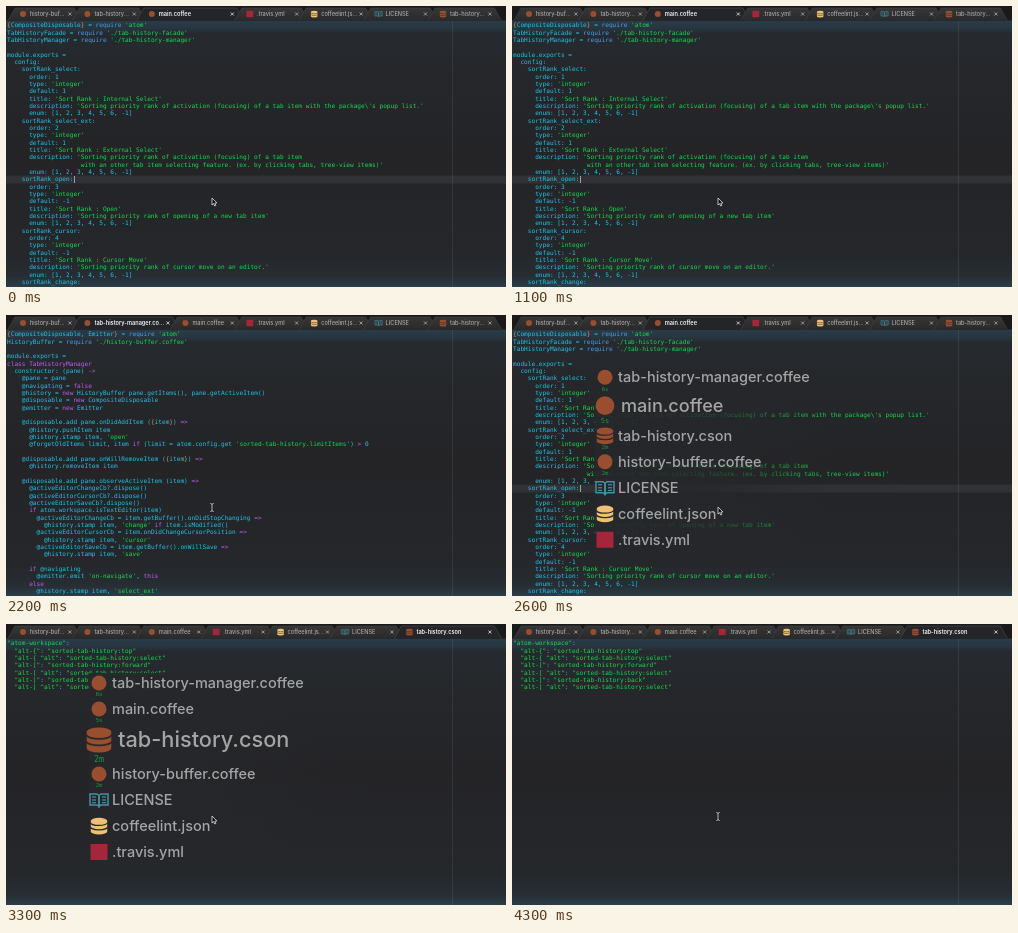
These frames come from a looping animation (500 px wide and 281 px high, 4.4 s). An HTML page with a canvas:

```html
<!DOCTYPE html>
<html lang="en">
<head>
<meta charset="utf-8">
<title>Sorted tab history</title>
<style>
html, body { margin: 0; width: 100%; height: 100%; overflow: hidden; background: #222326; }
canvas { display: block; width: 100vw; height: 100vh; }
</style>
</head>
<body>
<canvas id="stage"></canvas>
<script>
const W = 500, H = 281, LOOP = 4400;
const canvas = document.getElementById('stage');
const ctx = canvas.getContext('2d');
const SANS = 'Inter, sans-serif', MONO = '"DejaVu Sans Mono", monospace';
const CODE_SIZE = 6.13, CHAR = 3.69, LINE = 7.33, TOP = 19.3;
const CYAN = '#22c3e6', GREEN = '#12dc50', PURPLE = '#c25cf0', BLUE = '#459ff0', ORANGE = '#ee8a48';
const RUST = '#984e2f', YELLOW = '#f0c074', TEAL = '#4690a6', RED = '#a3263a';

const option = (name, order, def, title, text) => `
    sortRank_${name}:
      order: ${order}
      type: 'integer'
      default: ${def}
      title: 'Sort Rank : ${title}'
      description: 'Sorting priority rank of ${text}'
      enum: [1, 2, 3, 4, 5, 6, -1]`;

const MAIN = `{CompositeDisposable} = require 'atom'
TabHistoryFacade = require './tab-history-facade'
TabHistoryManager = require './tab-history-manager'

module.exports =
  config:` +
  option('select', 1, 1, 'Internal Select', "activation (focusing) of a tab item with the package\\'s popup list.") +
  option('select_ext', 2, 1, 'External Select', 'activation (focusing) of a tab item\n' + ' '.repeat(20) +
    'with an other tab item selecting feature. (ex. by clicking tabs, tree-view items)') +
  option('open', 3, -1, 'Open', 'opening of a new tab item') +
  option('cursor', 4, -1, 'Cursor Move', 'cursor move on an editor.') +
  '\n    sortRank_change:';

const MANAGER = `{CompositeDisposable, Emitter} = require 'atom'
HistoryBuffer = require './history-buffer.coffee'

module.exports =
class TabHistoryManager
  constructor: (pane) ->
    @pane = pane
    @navigating = false
    @history = new HistoryBuffer pane.getItems(), pane.getActiveItem()
    @disposable = new CompositeDisposable
    @emitter = new Emitter

    @disposable.add pane.onDidAddItem ({item}) =>
      @history.pushItem item
      @history.stamp item, 'open'
      @forgetOldItems limit, item if (limit = atom.config.get 'sorted-tab-history.limitItems') > 0

    @disposable.add pane.onWillRemoveItem ({item}) =>
      @history.removeItem item

    @disposable.add pane.observeActiveItem (item) =>
      @activeEditorChangeCb?.dispose()
      @activeEditorCursorCb?.dispose()
      @activeEditorSaveCb?.dispose()
      if atom.workspace.isTextEditor(item)
        @activeEditorChangeCb = item.getBuffer().onDidStopChanging =>
          @history.stamp item, 'change' if item.isModified()
        @activeEditorCursorCb = item.onDidChangeCursorPosition =>
          @history.stamp item, 'cursor'
        @activeEditorSaveCb = item.getBuffer().onWillSave =>
          @history.stamp item, 'save'

      if @navigating
        @emitter.emit 'on-navigate', this
      else
        @history.stamp item, 'select_ext'`;

const bind = (key, command) => `\n  "alt-${key}": "sorted-tab-history:${command}"`;
const KEYS = '"atom-workspace":' + bind('{', 'top') + bind('{ ^alt', 'select') +
  bind('[', 'forward') + bind('[ ^alt', 'select') + bind(']', 'back') + bind('] ^alt', 'select');

// Split source text into coloured runs with row and column.
function tokenize(text) {
  const rule = /('(?:\\.|[^'\\])*'|"[^"]*")|(\b(?:class(?: \w+)?|if|else|new|this|false)\b|[-=]>|>)|(\brequire\b)|(\w+(?=\())|([{}])|([@\w.?]+|[^\s])|(\s+)/g;
  const colors = [GREEN, PURPLE, BLUE, GREEN, ORANGE, CYAN, CYAN];
  const runs = [];
  let row = 0, col = 0;
  for (const [all, ...groups] of text.matchAll(rule)) {
    const color = colors[groups.findIndex(Boolean)];
    all.split('\n').forEach((part, i) => {
      if (i) { row++; col = 0; }
      const lead = part.length - part.trimStart().length;
      if (part.trim()) runs.push({ text: part.trimStart(), row, col: col + lead, color });
      col += part.length;
    });
  }
  return runs;
}

const FILES = {
  buffer: { name: 'history-buffer.coffee', tab: 'history-buf...', icon: dot },
  manager: { name: 'tab-history-manager.coffee', tab: 'tab-history...', active: 'tab-history-manager.co...', icon: dot, code: tokenize(MANAGER) },
  main: { name: 'main.coffee', tab: 'main.coffee', icon: dot, code: tokenize(MAIN) },
  travis: { name: '.travis.yml', tab: '.travis.yml', icon: block },
  lint: { name: 'coffeelint.json', tab: 'coffeelint.js...', icon: () => stack(YELLOW) },
  license: { name: 'LICENSE', tab: 'LICENSE', icon: book },
  cson: { name: 'tab-history.cson', tab: 'tab-history...', active: 'tab-history.cson', icon: () => stack(RUST), code: tokenize(KEYS) }
};
const TABS = Object.keys(FILES);
const REST = ['cson', 'buffer', 'license', 'lint', 'travis'];

// Each popup session: list order, time of each selection, fade span.
const POPUPS = [
  { list: ['main', 'manager', ...REST], picks: [[1300, 'manager']], fade: [1550, 2050],
    ages: { main: '8s', manager: '0ms', cson: '2m', buffer: '2m' } },
  { list: ['manager', 'main', ...REST], picks: [[2500, 'main'], [2900, 'cson']], fade: [3500, 3900],
    ages: { manager: '6s', main: '5s', cson: '2m', buffer: '2m' } }
];
const PICKS = [[0, 'main'], ...POPUPS.flatMap(p => p.picks)];

const clamp = v => Math.max(0, Math.min(1, v));

function text(str, x, y, size, color, family = SANS, weight = 400, align = 'left') {
  ctx.font = `${weight} ${size}px ${family}`;
  ctx.fillStyle = color;
  ctx.textAlign = align;
  ctx.textBaseline = 'alphabetic';
  ctx.fillText(str, x, y + size * 0.35);
}

function line(points, color, width) {
  ctx.beginPath();
  points.forEach(([x, y]) => ctx.lineTo(x, y));
  ctx.strokeStyle = color;
  ctx.lineWidth = width;
  ctx.stroke();
}

// Linear gradient from [position, colour] stops.
function ramp(x0, y0, x1, y1, stops) {
  const g = ctx.createLinearGradient(x0, y0, x1, y1);
  stops.forEach(([p, c]) => g.addColorStop(p, c));
  return g;
}

// Icons are drawn around the origin in an 18 unit box.
function dot() {
  ctx.fillStyle = RUST;
  ctx.beginPath();
  ctx.arc(0, 0, 7.5, 0, 7);
  ctx.fill();
}

function block() {
  ctx.fillStyle = RED;
  ctx.fillRect(-8.5, -8, 17, 16);
}

function stack(color) {
  ctx.fillStyle = color;
  ctx.beginPath();
  ctx.ellipse(0, -5.2, 8.2, 3, 0, Math.PI, 0);
  ctx.ellipse(0, 5.5, 8.2, 3, 0, 0, Math.PI);
  ctx.fill();
  ctx.strokeStyle = '#28292c';
  ctx.lineWidth = 1.2;
  for (const y of [-3.6, 0.8]) {
    ctx.beginPath();
    ctx.ellipse(0, y, 8.6, 3, 0, 0, Math.PI);
    ctx.stroke();
  }
}

function book() {
  for (const s of [-1, 1]) {
    line([[0, -4.5], [s * 2, -6], [s * 9, -6], [s * 9, 5], [s * 2, 5], [0, 6.5], [0, -4.5]], TEAL, 1.5);
    for (const y of [-3, 0, 2.7]) line([[s * 3, y], [s * 7, y]], TEAL, 1.2);
  }
}

function icon(file, x, y, scale) {
  ctx.save();
  ctx.translate(x, y);
  ctx.scale(scale, scale);
  file.icon();
  ctx.restore();
}

function backdrop() {
  ctx.fillStyle = ramp(0, 14, 0, H, [[0, '#2a3b48'], [0.03, '#283640'], [0.05, '#262a2f'], [0.2, '#25272a'],
    [0.5, '#242427'], [0.88, '#25272a'], [0.96, '#272d33'], [1, '#2b3d4a']]);
  ctx.fillRect(0, 0, W, H);
}

function drawTabs(active) {
  ctx.fillStyle = '#1a1a1b';
  ctx.fillRect(0, 0, W, 14.5);
  const idle = ramp(0, 2, 0, 14.5, [[0, '#363637'], [1, '#2a2a2b']]);
  let x = 7;
  for (const id of TABS) {
    const on = id === active, file = FILES[id], w = on ? 98 : 64.4;
    ctx.beginPath();
    [[x - 5, 14.5], [x + 2, 2], [x + w - 3, 2], [x + w + 4, 14.5]].forEach(p => ctx.lineTo(...p));
    ctx.fillStyle = on ? '#242529' : idle;
    ctx.fill();
    ctx.strokeStyle = on ? '#4c4e52' : '#444446';
    ctx.lineWidth = 0.6;
    ctx.stroke();
    icon(file, x + 10, 8, 0.4);
    text(on && file.active || file.tab, x + 17, 8, 5.6, on ? '#f4f4f4' : '#a8a8aa', SANS, on ? 600 : 500);
    const cx = x + w - 7.5, ink = on ? '#d8d8d8' : '#a4a4a6';
    line([[cx - 1.5, 6.5], [cx + 1.5, 9.5]], ink, 0.9);
    line([[cx + 1.5, 6.5], [cx - 1.5, 9.5]], ink, 0.9);
    x += w;
  }
}

function drawCode(active) {
  if (active === 'main') {
    ctx.fillStyle = 'rgba(120,130,140,0.14)';
    ctx.fillRect(0, 169.5, W, 8);
    ctx.fillStyle = '#d0d0d0';
    ctx.fillRect(68, 170, 0.7, 7);
  }
  ctx.fillStyle = 'rgba(130,140,150,0.17)';
  ctx.fillRect(446, 15, 1, H);
  for (const r of FILES[active].code)
    text(r.text, 1 + r.col * CHAR, TOP + r.row * LINE, CODE_SIZE, r.color, MONO);
}

// Growth of one row: 1 at rest, 1.5 when selected.
function rowScale(popup, id, t) {
  let s = 1;
  popup.picks.filter(([at]) => t >= at).forEach(([at, pick], i) => {
    const k = clamp((t - at) / 200);
    if (pick === id) s = 1 + 0.5 * k;
    else if (i && popup.picks[i - 1][1] === id) s = 1.5 - 0.5 * k;
  });
  return s;
}

function drawPopup(popup, t) {
  const scales = popup.list.map(id => rowScale(popup, id, t));
  const height = 26 * scales.reduce((a, b) => a + b, 0);
  const shade = a => `rgba(38,39,42,${a})`;
  let y = 143.5 - height / 2;
  ctx.save();
  ctx.globalAlpha = 1 - clamp((t - popup.fade[0]) / (popup.fade[1] - popup.fade[0]));
  ctx.fillStyle = ramp(80, 0, 400, 0,
    [[0, shade(0.94)], [0.2, shade(0.92)], [0.4, shade(0.75)], [0.6, shade(0.35)], [0.75, shade(0.06)], [1, shade(0)]]);
  ctx.fillRect(83, y + 3, 317, height - 3);
  popup.list.forEach((id, i) => {
    const s = scales[i], mid = y + 13 * s, lift = mid - 3.5 * (s - 1), file = FILES[id];
    icon(file, 93, lift, s);
    text(file.name, 106 + 12 * (s - 1), lift, 14.5 * s, '#a5a5a5', SANS, 500);
    const age = popup.ages[id];
    if (age) text(age, 93, mid + 11.5 * s, 5.6 * s, '#129a3c', MONO, 400, 'center');
    y += 26 * s;
  });
  ctx.restore();
}

function drawPointer(beam) {
  ctx.save();
  ctx.translate(206, 192);
  if (beam) {
    for (const [c, w] of [['#111', 2], ['#ddd', 0.9]]) {
      line([[-1.7, -3.5], [0, -2.8], [1.7, -3.5]], c, w);
      line([[0, -2.8], [0, 3.8]], c, w);
      line([[-1.7, 4.5], [0, 3.8], [1.7, 4.5]], c, w);
    }
  } else {
    ctx.beginPath();
    [[0, 0], [0, 7], [1.6, 5.6], [2.7, 8], [3.8, 7.5], [2.8, 5.1], [4.9, 5]].forEach(p => ctx.lineTo(...p));
    ctx.closePath();
    ctx.fillStyle = '#0c0c0c';
    ctx.fill();
    ctx.strokeStyle = '#e4e4e4';
    ctx.lineWidth = 0.8;
    ctx.stroke();
  }
  ctx.restore();
}

function draw(now) {
  const t = Math.floor((now % LOOP) / 100) * 100;
  const ratio = window.devicePixelRatio || 1;
  const w = Math.round(innerWidth * ratio), h = Math.round(innerHeight * ratio);
  if (canvas.width !== w || canvas.height !== h) { canvas.width = w; canvas.height = h; }
  ctx.setTransform(w / W, 0, 0, h / H, 0, 0);
  const active = PICKS.filter(([at]) => at <= t).pop()[1];
  const popup = POPUPS.find(p => t >= p.picks[0][0] && t < p.fade[1]);
  backdrop();
  drawCode(active);
  drawTabs(active);
  if (popup) drawPopup(popup, t);
  drawPointer(t >= 1300 && !popup);
}

const start = performance.now();
function tick() {
  draw(performance.now() - start);
  requestAnimationFrame(tick);
}
tick();
</script>
</body>
</html>
```
